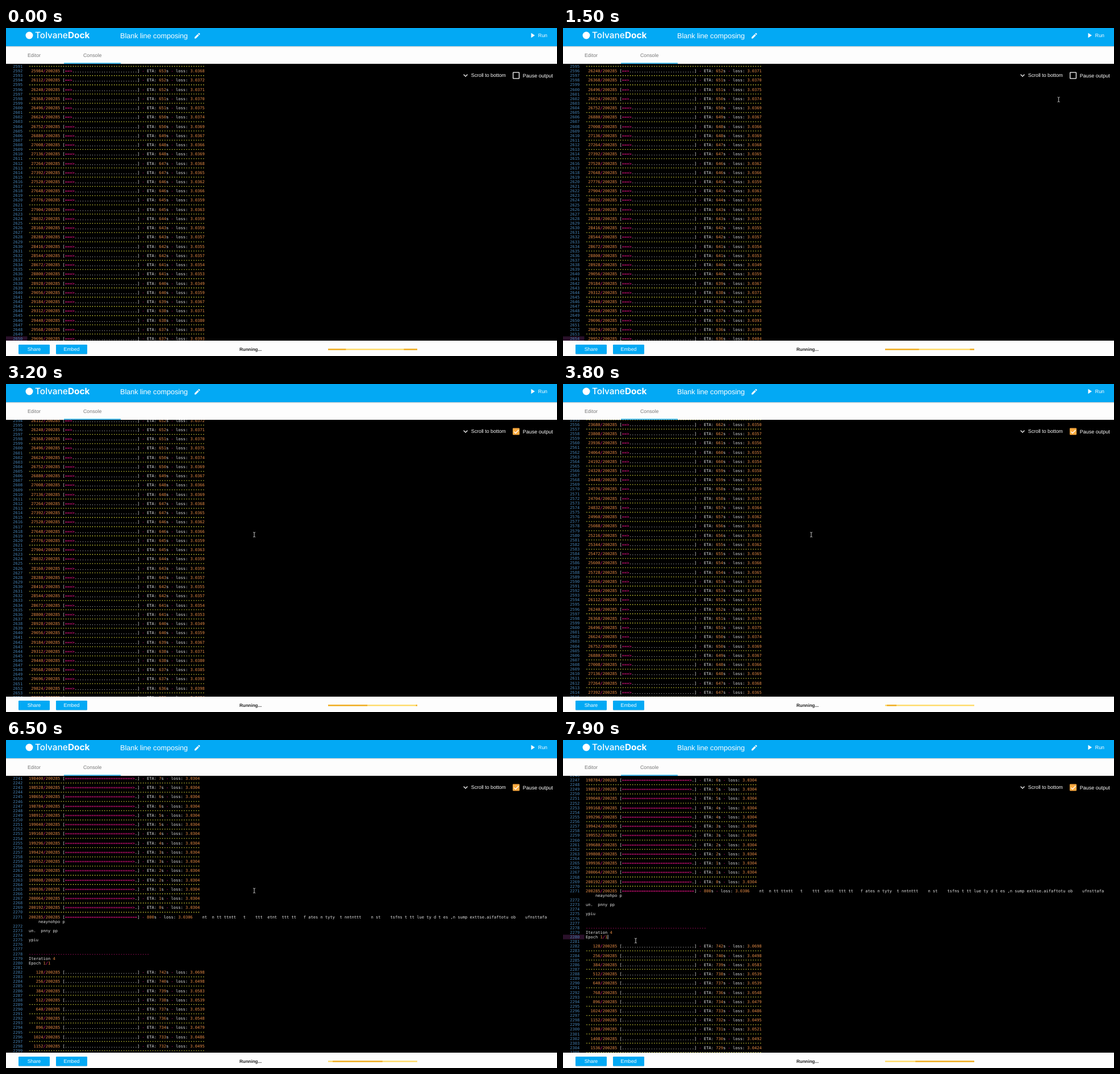
Recreate the animation shown at these times as an HTML page. Size 970x577 px, loop 8 s.

```html
<!DOCTYPE html>
<html lang="en">
<head>
<meta charset="utf-8">
<title>Training console</title>
<style>
  html, body { margin: 0; width: 100%; height: 100%; overflow: hidden; background: #fdfdfd; }
  svg { display: block; text-rendering: geometricPrecision; }
  .ui { font: 8.8px "Liberation Sans", Arial, sans-serif; }
  .code { font: 7.054px "DejaVu Sans Mono", monospace; fill: #e4e4e4; }
  .code text { white-space: pre; }
  .ln { fill: #4682b4; }
  .num { fill: #e78c45; }
  .op { fill: #ff1493; }
  .dots { stroke: #e2e23c; stroke-width: 1.3; stroke-dasharray: 1.3 2.947; }
</style>
</head>
<body>
<svg id="stage" width="970" height="577" viewBox="0 0 970 577">
  <defs>
    <linearGradient id="shade" x2="0" y2="1">
      <stop stop-color="#000" stop-opacity=".22"/>
      <stop offset="1" stop-color="#000" stop-opacity="0"/>
    </linearGradient>
    <clipPath id="track"><rect x="567" y="564.3" width="157" height="2.2"/></clipPath>
  </defs>
  <rect width="970" height="577" fill="#fdfdfd"/>
  <rect width="970" height="32" fill="#03a9f4"/>
  <rect y="32" width="970" height="2" fill="url(#shade)"/>

  <circle cx="41" cy="13" r="6.5" fill="#fff"/>
  <text x="51" y="18.2" fill="#fff" font-family="Inter, sans-serif" font-size="15.4" font-weight="500">Tolvane<tspan font-weight="700">Dock</tspan></text>
  <g class="ui" fill="#fff">
    <text x="201" y="18" font-size="12.6">Blank line composing</text>
    <path d="M332 16.2V18.4H334.2L339.6 13 337.4 10.8ZM338.1 10.1 340.3 12.3 341.5 11.1Q341.8 10.7 341.4 10.3L340.1 9Q339.7 8.7 339.3 9Z"/>
    <path d="M924.5 8.8V17.2L931 13Z"/>
    <text x="936.8" y="16.3">Run</text>
  </g>
  <g class="ui" fill="#777">
    <text x="38" y="50.6">Editor</text>
    <text x="136" y="50.6">Console</text>
  </g>
  <rect x="102" y="61.3" width="100" height="1.4" fill="#03a9f4"/>

  <svg y="63" width="970" height="487" viewBox="0 63 970 487">
    <rect y="63" width="970" height="487"/>
    <g id="rows" class="code"></g>
  </svg>

  <g class="ui" fill="#fff">
    <path d="M805.6 81.7 809 85.1 812.4 81.7" fill="none" stroke="#fff" stroke-width="1.3"/>
    <text x="818.8" y="86.4">Scroll to bottom</text>
    <text x="909.8" y="86.9" font-size="9">Pause output</text>
  </g>
  <circle id="ripple" cx="898" cy="84" fill="#ffab40"/>
  <rect id="box" x="892.7" y="78.2" width="10.7" height="10.7" rx=".6" stroke-width="1.3"/>
  <path id="tick" d="M894.3 83.8 897 86.5 902.4 81" fill="none" stroke="#fff" stroke-width="1.3"/>

  <g class="ui" fill="#fff" id="buttons"></g>
  <text class="ui" x="411" y="567.8" style="font-size:8px;font-weight:bold" fill="#222">Running...</text>
  <g clip-path="url(#track)">
    <rect x="567" y="564" width="157" height="3" fill="#ffd95e"/>
    <rect id="primary" y="564" height="3" fill="#eeaa22"/>
    <rect id="secondary" y="564" height="3" fill="#eeaa22"/>
  </g>

  <path id="beam" d="M-2-4.2Q0-4.2 0-3.2Q0-4.2 2-4.2M0-3.2V3.2M-2 4.2Q0 4.2 0 3.2Q0 4.2 2 4.2" fill="none" stroke="#ddd" stroke-width=".9"/>
  <path id="hand" d="M-1.6-3.2Q-.7-4.2 .1-3.2V.2Q1-.6 1.7.3 2.6-.4 3.2.6 4.5.2 4.7 1.4V4L3.7 6.8H-1.5L-4 2.8Q-4.2 1.6-3 1.8L-1.6 3Z" fill="#fff" stroke="#222" stroke-width=".5"/>
</svg>

<script>
const LOOP = 8000, STEP = 100;
const PITCH = 4.247, ROW = 8.12, FIRST_BASELINE = 70, LEFT = 40;
const TOTAL = 200285, BATCH = 128, WRAPPED = 2271;
const $ = id => document.getElementById(id);
const clamp = (v, lo, hi) => Math.min(hi, Math.max(lo, v));
const linear = u => u;
const smooth = u => u * u * (3 - 2 * u);

// Value at t between [time, value, ...] keys; `at` picks the column
function track(keys, t, ease = linear, at = 1) {
  const i = keys.findIndex(key => t < key[0]);
  if (i === 0) return keys[0][at];
  if (i < 0) return keys[keys.length - 1][at];
  const a = keys[i - 1], b = keys[i];
  return a[at] + (b[at] - a[at]) * ease((t - a[0]) / (b[0] - a[0]));
}

function noise(seed) {
  const v = Math.sin(seed * 12.9898) * 43758.5453;
  return 2 * (v - Math.floor(v)) - 1;
}

// [line, batch logged on it]; two lines per batch from there on
const runs = [[2141, 1500], [2282, 1], [2402, 83], [2530, 172]];
const etaCurve = [[1, 742], [12, 729], [113, 704.3], [142, 684.3], [203, 653.4], [236, 635], [1540, 12.7], [1565, 0]];
const lossCurve = [[1, 600], [12, 450], [113, 270], [123, 230], [142, 315], [207, 372], [226, 352], [236, 418], [1540, 304]];
const prose = {
  2271: "200285/200285 [" + "=".repeat(30) + "] - 800s - loss: 3.0306    nt  n tt ttntt   t    ttt  etnt  ttt tt   f ates n tyty  t nntnttt    n st    tsfns t tt lue ty d t es ,n sump exttse.aifaftotu ob    ufnsttafa",
  2272: "", 2273: "un.  pnny pp", 2274: "", 2275: "ypiu", 2276: "", 2277: "",
  2278: "-".repeat(50), 2279: "Iteration 4", 2280: "Epoch 1/1", 2281: ""
};

function logLine(n) {
  const [line, first] = runs.filter(run => run[0] <= n).pop();
  const batch = first + (n - line) / 2;
  const done = batch * BATCH;
  const filled = Math.floor(30 * done / TOTAL);
  const bar = (filled ? "=".repeat(filled - 1) + ">" : "").padEnd(30, ".");
  const eta = Math.floor(track(etaCurve, batch));
  // The running mean settles as batches accumulate
  const wobble = noise(batch) * 700 / (batch + 5);
  const loss = Math.round(track(lossCurve, batch) + wobble);
  return `${String(done).padStart(6)}/${TOTAL} [${bar}] - ETA: ${eta}s - loss: 3.0${loss}`;
}

const colour = s => s.replace(/\d+(\.\d+)?|[=>\/-]+/g, m =>
  `<tspan class="${/\d/.test(m) ? "num" : "op"}">${m.replace(/>/g, "&gt;")}</tspan>`);
const label = (x, y, body, cls = "") => `<text x="${x}" y="${y}" class="${cls}">${body}</text>`;
const rowOf = n => n + (n > WRAPPED ? 1 : 0);

function drawRows(top, active) {
  let out = "";
  for (let n = Math.floor(top) - 3; n < top + 62; n++) {
    const y = FIRST_BASELINE + (rowOf(n) - top) * ROW;
    if (n === active) {
      out += `<rect y="${y - 6.6}" width="37.5" height="${ROW}" fill="#2a112a"/>`;
      if (n === 2280) out += `<rect x="78.6" y="${y - 6.4}" width=".9" height="7.8"/>`;
    }
    out += label(12.3, y, n, "ln");
    if (n in prose) out += label(LEFT, y, colour(prose[n]));
    else if (n < WRAPPED === (n % 2 === 0)) {
      const width = (n < WRAPPED ? 71 : 73) * PITCH;
      out += `<path class="dots" d="M${LEFT + 1.4} ${y - 2.5}h${width - 1.5}"/>`;
    } else out += label(LEFT, y, colour(logLine(n)));
    if (n === WRAPPED) out += label(LEFT + 4 * PITCH, y + ROW, "neaynohpo p");
  }
  $("rows").innerHTML = out;
}

// Edges of both bars over one sweep, as fractions of the track
const bars = {
  primary: { left: [[.68, -.1], [1, 1.01]], right: [[.55, 0], [.66, .44], [.85, 1.03]] },
  secondary: { left: [[.23, .02], [.43, .34], [.6, .85], [.68, 1.03]], right: [[0, 0], [.25, .61], [.42, 1.01]] }
};
const barPhase = [[0, .6], [800, 1], [2200, 2.29], [3200, 2.66], [4500, 3.51], [5450, 3.51], [6500, 4.25], [7900, 5.43]];

function drawProgress(t) {
  const phase = track(barPhase, t) % 1;
  for (const id in bars) {
    const left = track(bars[id].left, phase), right = track(bars[id].right, phase);
    $(id).setAttribute("x", 567 + 157 * left);
    $(id).setAttribute("width", 157 * Math.max(0, right - left));
  }
}

const pointer = [[200, 922, 20], [700, 800, 237], [1100, 800, 237], [1700, 898, 87], [2700, 898, 87],
  [3050, 437, 265], [7300, 437, 265], [7700, 128, 353]];

function drawPointer(t) {
  const place = `translate(${track(pointer, t, smooth, 1)} ${track(pointer, t, smooth, 2)})`;
  const overBox = t >= 1600 && t <= 2700;
  for (const [id, shown] of [["hand", overBox], ["beam", t >= 200 && !overBox]]) {
    $(id).setAttribute("transform", place);
    $(id).setAttribute("visibility", shown ? "visible" : "hidden");
  }
}

function drawCheckbox(t) {
  const checked = t >= 2300, pressed = t >= 2100 && !checked;
  $("ripple").setAttribute("r", track([[2000, 0], [2200, 15]], t));
  $("ripple").setAttribute("opacity", track([[2200, .32], [2600, 0]], t));
  $("box").setAttribute("fill", checked ? "#ffab40" : pressed ? "#8a5a20" : "none");
  $("box").setAttribute("stroke", checked ? "#ffab40" : pressed ? "#ffc988" : "#fff");
  $("tick").setAttribute("visibility", checked ? "visible" : "hidden");
}

const scroll = [[2900, 2600], [3200, 2595.4], [3700, 2570], [4500, 2462.24], [5450, 2462.24],
  [6350, 2241], [6600, 2241], [7150, 2246.63]];
let shownRows = "";

function render(t) {
  const added = 2 * clamp(Math.floor((t - 600) / 467) + 1, 0, 4);
  const top = t < 2900 ? 2592 + added : track(scroll, t);
  const active = t >= 7800 ? 2280 : 2650 + added;
  const key = top + "/" + active;
  if (key !== shownRows) drawRows(top, active);
  shownRows = key;
  drawProgress(t);
  drawPointer(t);
  drawCheckbox(t);
}

$("buttons").innerHTML = [[22, "Share"], [88, "Embed"]].map(([x, name]) =>
  `<rect x="${x}" y="558" width="55" height="16.2" rx="1.4" fill="#000" opacity=".2"/>
   <rect x="${x}" y="557" width="55" height="16.4" rx="1.2" fill="#03a9f4"/>
   <text x="${x + 27.5}" y="568.4" text-anchor="middle">${name}</text>`).join("");

const start = performance.now();
function tick() {
  const t = (performance.now() - start) % LOOP;
  render(Math.floor(t / STEP) * STEP);
  requestAnimationFrame(tick);
}
tick();
</script>
</body>
</html>
```
